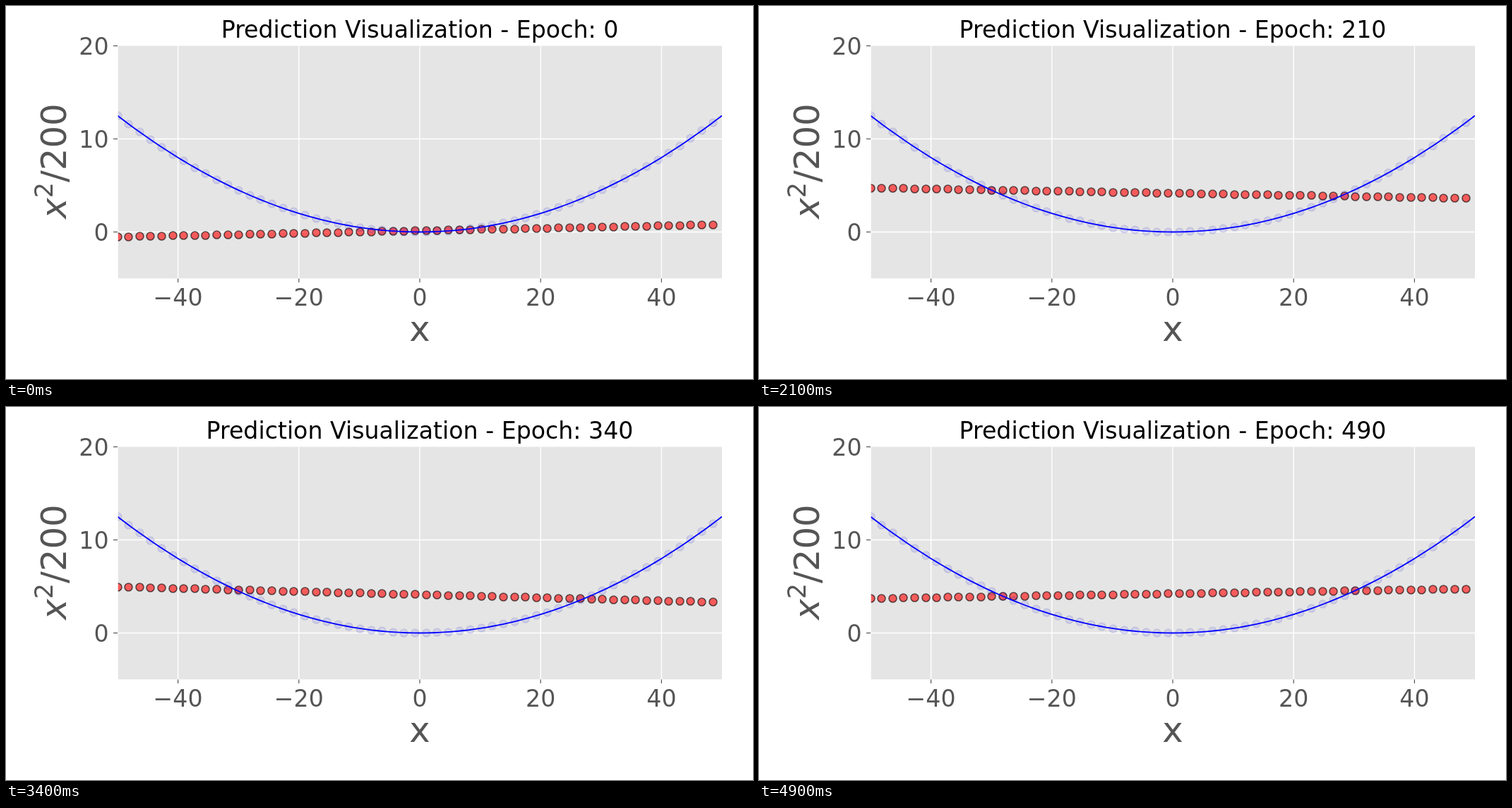
Write an HTML page that moves like this. It is 1058 by 529 pixels and loops after 5 s.

```html
<!DOCTYPE html>
<html lang="en">
<head>
<meta charset="utf-8">
<title>Prediction Visualization</title>
<style>
  html, body { margin: 0; width: 100%; height: 100%; overflow: hidden; background: #fff; }
  svg { display: block; width: 100vw; height: 100vh; }
  text { font-family: "DejaVu Sans", sans-serif; font-size: 33.2px; fill: #555; }
  .mid { text-anchor: middle; }
  .end { text-anchor: end; }
  .label { font-size: 49.8px; }
  .tick { stroke: #555; stroke-width: 1.2; }
  .grid { stroke: #fff; stroke-width: 1.4; }
  .pred { fill: #f00; fill-opacity: .6; stroke: #000; stroke-opacity: .6; stroke-width: 1.6; }
  .data { fill: #00f; fill-opacity: .1; stroke: #00008b; stroke-opacity: .1; stroke-width: 1.6; }
  #title { fill: #000; }
</style>
</head>
<body>
<svg viewBox="0 0 1058 529">
  <defs><clipPath id="area"><rect x="158.7" y="56.5" width="855.3" height="329.8"/></clipPath></defs>
  <rect x="158.7" y="56.5" width="855.3" height="329.8" fill="#e5e5e5"/>
  <g id="axes"></g>
  <g clip-path="url(#area)">
    <g id="preds"></g>
    <g id="samples"></g>
    <path id="curve" fill="none" stroke="#00f" stroke-width="1.8"/>
  </g>
  <text id="title" class="mid" x="586" y="45"></text>
  <text class="mid label" x="586" y="475">x</text>
  <text class="mid label" transform="translate(84.5 220) rotate(-90)"><tspan font-style="italic">x</tspan><tspan dy="-19" font-size="34.9">2</tspan><tspan dy="19">/200</tspan></text>
</svg>
<script>
const $ = id => document.getElementById(id);
const px = x => 586 + 8.56 * x;
const py = y => 320.5 - 13.2 * y;
const snap = v => Math.floor(v) + 0.5;
const f = x => x * x / 200;

function add(parent, tag, attrs, text) {
  const el = document.createElementNS("http://www.w3.org/2000/svg", tag);
  for (const k in attrs) el.setAttribute(k, attrs[k]);
  if (text !== undefined) el.textContent = text;
  return parent.appendChild(el);
}

const line = (cls, x1, y1, x2, y2) => add($("axes"), "line", { class: cls, x1, y1, x2, y2 });

for (const v of [-40, -20, 0, 20, 40]) {
  const x = px(v);
  line("grid", x, 56.5, x, 386.3);
  line("tick", x, 386.5, x, 392);
  add($("axes"), "text", { class: "mid", x, y: 424.5 }, String(v).replace("-", "\u2212"));
}
for (const v of [0, 10, 20]) {
  const y = py(v);
  if (v < 20) line("grid", 158.7, y, 1014, y);
  line("tick", 152, y, 158, y);
  add($("axes"), "text", { class: "end", x: 145.5, y: y + 12 }, v);
}

const xs = Array.from({ length: 55 }, (_, i) => -50 + 1.824 * i);
const dot = (parent, cls, x) =>
  add($(parent), "circle", { class: cls, r: 5.5, cx: snap(px(x)), cy: snap(py(f(x))) });
const preds = xs.map(x => dot("preds", "pred", x));
xs.forEach(x => dot("samples", "data", x));

let path = "";
for (let x = -50; x <= 50; x++) path += (path ? "L" : "M") + px(x) + " " + py(f(x));
$("curve").setAttribute("d", path);

// Fitted line over training: [epoch, slope, settled intercept]
const fit = [
  [0, .0133, 4.22], [70, .0051, 4.22], [140, -.0077, 4.145], [210, -.0113, 4.165],
  [300, -.0214, 4.15], [380, -.0117, 4.095], [490, .0105, 4.225]
];

function model(epoch) {
  let i = 0;
  while (i < fit.length - 2 && epoch > fit[i + 1][0]) i++;
  const [a, b] = [fit[i], fit[i + 1]];
  const u = (epoch - a[0]) / (b[0] - a[0]);
  const mix = k => a[k] + (b[k] - a[k]) * u;
  return { slope: mix(1), bias: mix(2) - 4.09 * Math.exp(-epoch / 13) };
}

let shown = -1;
function draw(ms) {
  const epoch = Math.floor(ms % 5000 / 100) * 10;
  if (epoch === shown) return;
  shown = epoch;
  const { slope, bias } = model(epoch);
  preds.forEach((p, i) => p.setAttribute("cy", snap(py(bias + slope * xs[i]))));
  $("title").textContent = "Prediction Visualization - Epoch: " + epoch;
}

const start = performance.now();
function tick() {
  draw(performance.now() - start);
  requestAnimationFrame(tick);
}
tick();
</script>
</body>
</html>
```
